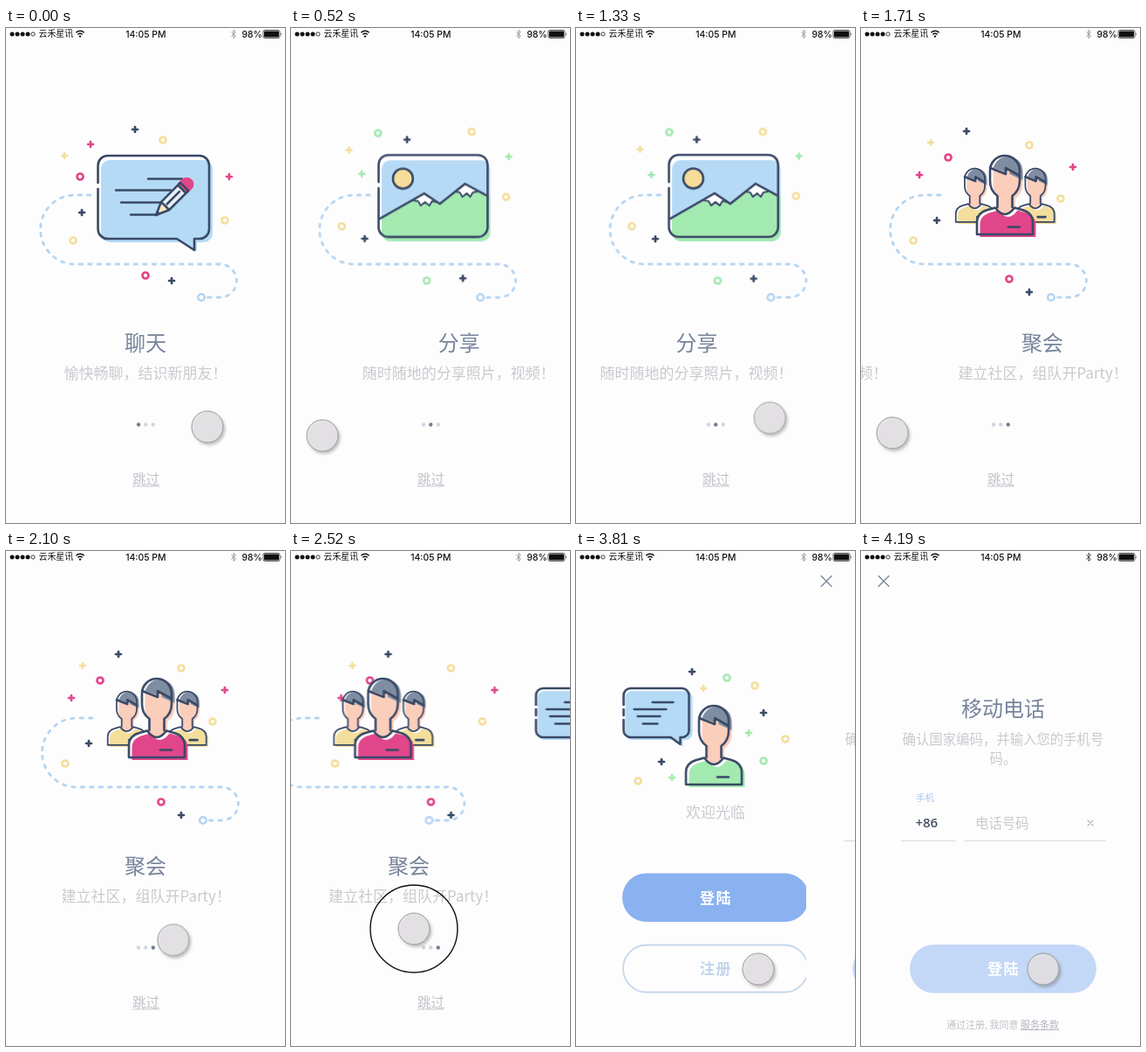
An HTML page that plays this animation: 320 px wide and 566 px high, repeating every 4.24 s.

```html
<!DOCTYPE html>
<html lang="zh-CN">
<head>
<meta charset="utf-8">
<title>引导页</title>
<style>
:root {
  --navy: #394966; --pink: #e2468a; --green: #a2eab0; --yellow: #f4de9b;
  --blue: #b5daf5; --skin: #fbcdbb; --hair: #7f8da2; --paper: #fefdfe;
  --title: #77849a; --soft: #c8cace;
}
html, body { margin: 0; width: 100%; height: 100%; overflow: hidden; background: var(--paper); }
svg { display: block; width: 320px; height: 566px; }
text { font-family: "Noto Sans CJK SC", "Noto Sans CJK", "Noto Sans", sans-serif; }
.title { font-size: 24px; font-weight: 500; fill: var(--title); text-anchor: middle; }
.sub { font-size: 17px; font-weight: 300; fill: var(--soft); }
.note { font-size: 15.4px; font-weight: 300; fill: var(--soft); }
.label { font-size: 17px; font-weight: 700; letter-spacing: 1.5px; text-anchor: middle; }
.bar { font: 500 10.4px Inter, "Liberation Sans", sans-serif; }
.line { fill: none; stroke: var(--navy); stroke-width: 2.6; stroke-linecap: round; stroke-linejoin: round; }
.line * { vector-effect: non-scaling-stroke; }
.bit { fill: none; stroke-width: 2.7; stroke-linecap: round; }
.cross { fill: none; stroke-linecap: round; }

.a { animation: 4.24s ease-in-out infinite; }
#sway { animation-name: sway; }
#deck { animation-name: deck; }
#guest { animation-name: guest; }
#chat, #photo, #team { transform-box: fill-box; transform-origin: center; }
#chat { animation-name: chat; }
#photo { animation-name: photo; }
#team { animation-name: team; }
#words { animation-name: words; }
#trail { animation-name: trail; }
#pager { animation-name: pager; }
#skip { animation-name: skip; transform-origin: 160px 516px; }
#login { animation-name: login; animation-timing-function: linear; }
#form { animation-name: form; animation-timing-function: linear; }
#touch { animation-name: touch; }
#knob { animation-name: knob; }
#ring { animation-name: ring; animation-timing-function: ease-out; }
#bt { animation-name: bt; }
.dot { fill: #d2d5dc; }
#d1 { animation-name: d1; }
#d2 { animation-name: d2; }
#d3 { animation-name: d3; }
.bit { animation: drift 4.24s ease-in-out infinite; }
.accent { animation-name: drift, accent; }

@keyframes drift {
  0%, 2% { transform: translate(var(--p0)); }
  14%, 30% { transform: translate(var(--p1)); }
  40%, 59.5% { transform: translate(var(--p2)); }
  68.5%, 100% { transform: translate(var(--p3)); }
}
@keyframes accent {
  0%, 4% { stroke: var(--pink); }
  13%, 31% { stroke: var(--green); }
  39%, 60% { stroke: var(--pink); }
  67%, 100% { stroke: var(--green); }
}
@keyframes sway {
  0%, 1.2% { transform: translate(0, 0); }
  11% { transform: translate(-8px, 0); }
  17% { transform: translate(5px, 1px); }
  20.28%, 21% { transform: translate(3.5px, 1px); }
  29% { transform: translate(0, 0); }
  40.33% { transform: translate(-6px, 0); }
  47% { transform: translate(3px, 0); }
  53%, 56% { transform: translate(0, 0); }
  59.43% { transform: translate(-15.5px, 0); }
  66% { transform: translate(-22px, 0); }
  69.58% { transform: translate(-7px, 0); }
  78%, 89.2% { transform: translate(0, 0); animation-timing-function: linear; }
  89.9% { transform: translate(-3px, 0); }
  98%, 100% { transform: translate(-28px, 0); }
}
@keyframes deck {
  0%, 56.5% { transform: translateX(0); }
  59.43% { transform: translateX(-50px); }
  68%, 100% { transform: translateX(-320px); }
}
@keyframes guest {
  0%, 56.5% { transform: translateX(330px); }
  59.43% { transform: translateX(239px); }
  69.4%, 100% { transform: translateX(0); }
}
@keyframes chat {
  0%, 2% { opacity: 1; transform: scale(1); }
  8%, 100% { opacity: 0; transform: scale(.8); }
}
@keyframes photo {
  0%, 6% { opacity: 0; transform: scale(.8); }
  13%, 31% { opacity: 1; transform: scale(1); }
  36%, 100% { opacity: 0; transform: scale(.8); }
}
@keyframes team {
  0%, 34% { opacity: 0; transform: scale(.8); }
  39.5%, 100% { opacity: 1; transform: scale(1); }
}
@keyframes words {
  0%, 1.2% { transform: translateX(0); }
  11% { transform: translateX(-240px); animation-timing-function: ease-out; }
  17%, 29% { transform: translateX(-288px); }
  40.33% { transform: translateX(-528px); }
  46.5%, 56.5% { transform: translateX(-576px); }
  59.43% { transform: translateX(-601px); }
  68%, 100% { transform: translateX(-880px); }
}
@keyframes trail {
  0%, 56.5% { transform: translateX(0); }
  59.43% { transform: translateX(4.5px); }
  68%, 100% { transform: translateX(40px); }
}
@keyframes pager { 0%, 59.5% { opacity: 1; } 64%, 100% { opacity: 0; } }
@keyframes skip {
  0%, 60% { opacity: 1; transform: none; }
  70%, 100% { opacity: 0; transform: translate(-3px, 7px) scale(.4); }
}
@keyframes d1 { 0%, 6.5% { fill: #717f95; } 8%, 100% { fill: #d2d5dc; } }
@keyframes d2 { 0%, 6.5% { fill: #d2d5dc; } 8%, 35% { fill: #717f95; } 36.5%, 100% { fill: #d2d5dc; } }
@keyframes d3 { 0%, 35% { fill: #d2d5dc; } 36.5%, 100% { fill: #717f95; } }
@keyframes login {
  0%, 57% { transform: translateX(330px); }
  59.43% { transform: translateX(290px); }
  63% { transform: translateX(130px); }
  67.45% { transform: translateX(21px); }
  69.4%, 89.2% { transform: translateX(0); }
  89.9% { transform: translateX(-3px); }
  98%, 100% { transform: translateX(-28px); }
}
@keyframes form {
  0%, 89% { transform: translateX(320px); }
  89.9% { transform: translateX(260px); }
  91.2% { transform: translateX(150px); }
  93% { transform: translateX(52px); }
  95.5% { transform: translateX(10px); }
  98.4%, 100% { transform: translateX(0); }
}
@keyframes touch {
  0%, 1.2% { transform: translate(231px, 456px); }
  11.5%, 13.5% { transform: translate(36px, 466px); }
  20.28% { transform: translate(241px, 440px); }
  29% { transform: translate(241px, 444px); }
  40.33%, 42% { transform: translate(36px, 463px); }
  53%, 55.5% { transform: translate(232px, 440px); animation-timing-function: linear; }
  59.43% { transform: translate(141px, 432px); }
  65% { transform: translate(60px, 430px); }
  75%, 100% { transform: translate(209px, 478px); }
}
@keyframes knob {
  0%, 62.5% { opacity: 1; }
  66%, 81% { opacity: 0; }
  83.5%, 100% { opacity: 1; }
}
@keyframes ring {
  0%, 57.4% { opacity: 0; transform: scale(.36); }
  57.5% { opacity: 1; transform: scale(.36); }
  59.35%, 60.6% { opacity: 1; transform: scale(1); }
  61.8%, 100% { opacity: 0; transform: scale(1); }
}
@keyframes bt { 0%, 94% { stroke: #8e8e92; } 96%, 100% { stroke: #333; } }
</style>
</head>
<body>
<svg viewBox="0 0 320 566">
  <defs>
    <filter id="shade" x="-40%" y="-40%" width="190%" height="190%">
      <feDropShadow dx="2" dy="2.5" stdDeviation="1.8" flood-color="#555" flood-opacity=".4"/>
    </filter>
    <path id="head" d="M-8.500 60V47C-14 43-17 38-17 30V18a17 17 0 0 1 34 0V30c0 8-3 13-8.500 17V60"/>
    <path id="shirt" d="M-32 91V77c0-8 5-12 12-14l9-2.500q11 15 22 0l9 2.500c7 2 12 6 12 14V91Z"/>
    <path id="neck" d="M-8.500 46h17V60.500h2.500q-11 15-22 0h2.500Z"/>
    <g id="person">
      <g fill="var(--paper)">
        <use href="#head"/><use href="#neck"/><use href="#shirt"/>
      </g>
      <g transform="translate(3.500 3)">
        <use href="#shirt" fill="currentColor"/>
        <use href="#head" fill="var(--skin)"/>
        <path d="M-17 12Q-12-1 0-1 17 0 17 18v8L2 19V12L-2 17Z" fill="var(--hair)"/>
      </g>
      <use href="#neck" fill="var(--skin)"/>
      <g class="line">
        <use href="#head"/>
        <path d="M-17 15L1 22v-7l16 9"/>
        <use href="#shirt"/>
        <path d="M4 82.500h13"/>
      </g>
    </g>
  </defs>

  <rect width="320" height="566" fill="var(--paper)"/>

  <g id="sway" class="a">
    <g id="bits"></g>
    <g id="deck" class="a">
      <g fill="none" stroke="#b4d5f2" stroke-width="2.800">
        <path d="M97 191H79a39.500 39.500 0 0 0 0 79H245.500a19 19 0 0 1 0 38H230" stroke-dasharray="3.500 7" stroke-linecap="round"/>
        <circle cx="224" cy="308" r="3.800" stroke-width="2.600"/>
      </g>

      <g id="chat" class="a">
        <path d="M119 151H227a10 10 0 0 1 10 10V235a10 10 0 0 1-10 10H219v11l-16-11H119a10 10 0 0 1-10-10V161a10 10 0 0 1 10-10Z" fill="var(--blue)"/>
        <g class="line">
          <path d="M105.500 177V157a11 11 0 0 1 11-11H222a11 11 0 0 1 11 11V230a11 11 0 0 1-11 11H216V254L196 241H116.500a11 11 0 0 1-11-11V184"/>
          <path d="M163 172.500H202M126 185.500H189M132 199.500H178M143 213.500H173" stroke-width="2.400"/>
        </g>
        <g transform="translate(172 214) rotate(-45)">
          <path d="M0 0L15-6.500V6.500Z" fill="#f8e6c0"/>
          <path d="M15-6.500H43V6.500H15Z" fill="#e7eff8"/>
          <path d="M44-6.500h6a6.500 6.500 0 0 1 0 13h-6Z" fill="var(--pink)" stroke="var(--pink)" stroke-width="3"/>
          <path class="line" d="M0 0L15-6.500H46V6.500H15ZM15-6.500V6.500M18 0H38M42-6.500V6.500" stroke-width="2.300"/>
          <path d="M0 0L5-2.200V2.200Z" fill="var(--navy)"/>
        </g>
      </g>

      <g transform="translate(-3.500 -1)">
        <g id="photo" class="a">
          <rect x="114" y="152" width="125" height="93" rx="10" fill="var(--blue)"/>
          <path d="M114 219L163 191l18 12 29-23 29 14V235a10 10 0 0 1-10 10H124a10 10 0 0 1-10-10Z" fill="var(--green)"/>
          <path d="M163 190l-14 8 6 1 3 5 5-4 6 4 3-5 6 1ZM210 179l-12 9 5 1 3 5 5-4 5 4 3-5 5-1Z" fill="#fff"/>
          <circle cx="139" cy="173" r="11.500" fill="#f7dd98"/>
          <g class="line">
            <path d="M110.500 177V157a11 11 0 0 1 11-11H225a11 11 0 0 1 11 11V229a11 11 0 0 1-11 11H121.500a11 11 0 0 1-11-11V184"/>
            <circle cx="138.500" cy="173" r="11.500"/>
            <path d="M112 219L163 190l18 12 29-23 26 14"/>
            <path d="M150 198l6 1 3 5 5-4 5 4 3-5 5 1M199 188l5 1 3 5 5-4 4 4 3-5 5-1" stroke-width="2"/>
          </g>
        </g>
      </g>

      <g transform="translate(6 0)">
        <g id="team" class="a">
          <use href="#person" transform="translate(130.500 160) scale(.68)" color="var(--yellow)"/>
          <use href="#person" transform="translate(200 160) scale(.68)" color="var(--yellow)"/>
          <use href="#person" transform="translate(165 145)" color="var(--pink)"/>
        </g>
      </g>
    </g>

    <g id="guest" class="a">
      <g transform="translate(6.500 0)">
        <path d="M61 160h61a8 8 0 0 1 8 8v40a8 8 0 0 1-8 8h-3v8l-10-8H61a8 8 0 0 1-8-8v-40a8 8 0 0 1 8-8Z" fill="var(--blue)"/>
        <g class="line">
          <path d="M51 176V165a8 8 0 0 1 8-8h59a8 8 0 0 1 8 8v40a8 8 0 0 1-8 8h-2v8l-11-8H59a8 8 0 0 1-8-8V193M51 181v7"/>
          <path d="M84 173h24M63 181h37M67 189h26M73 197.500h17" stroke-width="2.300"/>
        </g>
        <use href="#person" transform="translate(154.500 176)" color="var(--green)"/>
      </g>
    </g>
  </g>

  <g id="words" class="a">
    <text class="title" x="160" y="369">聊天</text>
    <text class="sub" x="66.500" y="401">愉快畅聊，结识新朋友！</text>
    <g transform="translate(288 0)">
      <text class="title" x="160.500" y="369">分享</text>
      <text class="sub" x="49.500" y="401">随时随地的分享照片，视频！</text>
    </g>
    <g transform="translate(576 0)">
      <text class="title" x="160" y="369">聚会</text>
      <text id="trail" class="sub a" x="63.500" y="401">建立社区，组队开Party！</text>
    </g>
  </g>

  <g id="pager" class="a">
    <circle id="d1" class="a dot" cx="152" cy="453.500" r="2.200"/>
    <circle id="d2" class="a dot" cx="160.300" cy="453.500" r="2.200"/>
    <circle id="d3" class="a dot" cx="168.800" cy="453.500" r="2.200"/>
  </g>
  <g id="skip" class="a">
    <text x="160.500" y="521.500" font-size="15.500" font-weight="300" fill="#bfc2c7" text-anchor="middle">跳过</text>
    <path d="M145 524h31" stroke="#c6c8cd"/>
  </g>

  <g id="login" class="a">
    <text class="sub" x="129" y="304.500">欢迎光临</text>
    <rect x="56" y="368.500" width="214" height="55.500" rx="27.700" fill="#8ab1f0"/>
    <text class="label" x="163.500" y="402.500" fill="#fff">登陆</text>
    <rect x="57" y="450.500" width="212" height="54" rx="27" fill="none" stroke="#c5d7ea" stroke-width="1.800"/>
    <text class="label" x="163.500" y="484" fill="#c0d4ea">注册</text>
  </g>

  <g id="form" class="a">
    <rect x="3" width="320" height="566" fill="var(--paper)"/>
    <path class="cross" d="M20 28.500l12 12m0-12l-12 12" stroke="#77839a" stroke-width="1.200"/>
    <text class="title" x="163" y="189">移动电话</text>
    <text class="note" x="47.500" y="220.500">确认国家编码，并输入您的手机号</text>
    <text class="note" x="147.500" y="242.500">码。</text>
    <text x="63" y="286" font-size="10.500" fill="#a9c6ec">手机</text>
    <text x="62.500" y="316" font-size="15" font-weight="600" fill="#424d62" style="font-family:'Open Sans',Lato,sans-serif">+86</text>
    <text class="note" x="131" y="316.500">电话号码</text>
    <path d="M46 331.500h63M118 331.500h163" stroke="#d7d9df"/>
    <path class="cross" d="M260 308l6 6m0-6l-6 6" stroke="#b5b9c2" stroke-width="1.300"/>
    <rect x="56" y="450" width="214" height="55.500" rx="27.700" fill="#c3d7f7"/>
    <text class="label" x="163.500" y="484" fill="#fff">登陆</text>
    <text x="98" y="545.500" font-size="11" fill="#bdc0c6">通过注册, 我同意</text>
    <text x="183" y="545.500" font-size="11" fill="#b0b4bd">服务条款</text>
    <path d="M183 547.500h44" stroke="#b7bac2"/>
  </g>

  <g id="status">
    <g fill="#111">
      <circle cx="7" cy="7" r="2.500"/><circle cx="13" cy="7" r="2.500"/>
      <circle cx="19" cy="7" r="2.500"/><circle cx="25" cy="7" r="2.500"/>
      <circle cx="31" cy="7" r="2.100" fill="none" stroke="#111" stroke-width=".8"/>
      <text x="37.500" y="10.300" font-size="9.900" font-weight="500">云禾星讯</text>
      <text class="bar" x="160.300" y="10.800" text-anchor="middle">14:05 PM</text>
      <text class="bar" x="270.500" y="10.800">98%</text>
      <rect x="296" y="3.500" width="17" height="7" rx=".8"/>
      <path d="M315 5.500q1.600 1.500 0 3Z"/>
      <circle cx="85" cy="9.600" r="1.200"/>
    </g>
    <rect x="295" y="2.500" width="19" height="9" rx="1.800" fill="none" stroke="#111" stroke-width=".7"/>
    <path d="M80.300 5.300q4.700-4.200 9.400 0M82.300 7.500q2.700-2.400 5.400 0" fill="none" stroke="#111" stroke-width="1.500"/>
    <path id="bt" class="a" d="M258.500 4.300l5 5-2.500 2.300V2.400l2.500 2.300-5 5" fill="none" stroke-width=".9"/>
  </g>

  <g id="touch" class="a">
    <circle id="ring" class="a" r="50" fill="none" stroke="#111" stroke-width="1.400"/>
    <g id="knob" class="a">
      <circle r="18" fill="#e4e2e4" fill-opacity=".88" stroke="#99999c" stroke-width="1" filter="url(#shade)"/>
    </g>
  </g>
</svg>
<script>
// shape, tint, then a resting place for each of the four pages
const bits = `
plus navy 148,116 139.5,128 127,118 136,138
plus navy 87,211 91.5,242 93,220 101,241
plus navy 190,289 204.5,286 199,302 218,185
plus yellow 67,146 73.5,139 86,131 149,157
plus accent 97,133 87.5,168 73,168 113,259
plus accent 256,170 256.5,146 249,159 201,208
hoop yellow 180,128 215.5,118 199,134 208,154
hoop accent 85,170 107.5,118 106,148 176,145
hoop yellow 251,220 253.5,192 235,195 243,215
hoop yellow 77,243 64.5,226 66,243 74,263
hoop accent 160,283 162.5,289 176,287 218,240`;
const shapes = {
  plus: "M-3 0H3M0-3V3",
  hoop: "M-3.5 0a3.5 3.5 0 1 0 7 0a3.5 3.5 0 1 0-7 0Z"
};
const box = document.getElementById("bits");
for (const row of bits.trim().split("\n")) {
  const [shape, tint, ...places] = row.split(" ");
  const path = document.createElementNS("http://www.w3.org/2000/svg", "path");
  path.setAttribute("d", shapes[shape]);
  path.setAttribute("class", "bit " + tint);
  if (tint !== "accent") path.style.stroke = `var(--${tint})`;
  places.forEach((p, i) => path.style.setProperty("--p" + i, p.replace(",", "px,") + "px"));
  box.append(path);
}
</script>
</body>
</html>
```
